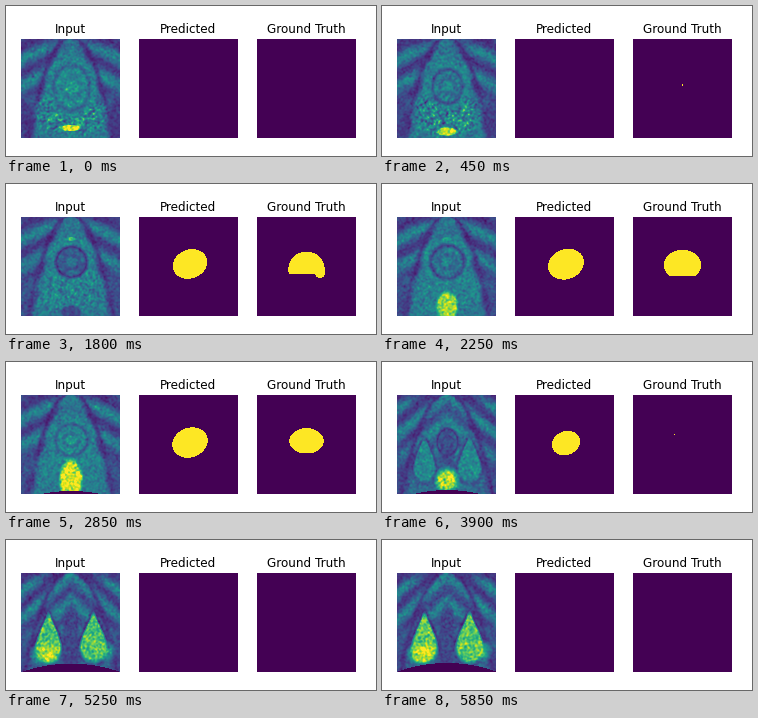
A matplotlib script for the animation above (6 s loop, 370 by 150 pixels).

```python
import numpy as np
import matplotlib.pyplot as plt
from matplotlib.animation import FuncAnimation

W, H, DPI = 370, 150, 100
N = 99          # panel side in pixels
SLICES = 40
STEP = 150      # ms per slice

Y, X = np.mgrid[0:N, 0:N] + 0.5
U = np.abs(X - 50)


def ease(i, start, end):
    p = np.clip((i - start) / (end - start), 0, 1)
    return p * p * (3 - 2 * p)


def pulse(i, mid, half):
    return ease(half - abs(i - mid), 0, half)


def noise(passes, seed):
    a = np.random.default_rng(seed).normal(size=(SLICES, N, N))
    for axis in [0] + [1, 2] * passes:
        a = (np.roll(a, 1, axis) + 2 * a + np.roll(a, -1, axis)) / 4
    return a / a.std()


FINE, BLOTCH = noise(1, 4), noise(4, 9)


def ellipse(cx, cy, rx, ry, edge=0.2, x=X):
    d = np.hypot((x - cx) / rx, (Y - cy) / ry)
    return np.clip((1 - d) / edge + 0.5, 0, 1)


def paint(img, mask, level, alpha=1.0):
    a = mask * alpha
    return img * (1 - a) + level * a


def scan(i):
    bladder = 1 - ease(i, 0, 7)
    gland = pulse(i, 16, 18)
    late = ease(i, 19, 29)
    fat = ease(i, 22, 38)

    # muscle and bone bands falling away from the midline
    depth = Y - (0.55 + 0.35 * late) * U
    fade = np.clip((85 - Y) / 45, 0.2, 1)
    img = 0.3 + 0.14 * fade * np.sin(2 * np.pi * depth / 26 + 3 - 2 * i / SLICES)
    img = paint(img, np.clip(1.2 - Y / 9, 0, 1) * (U > 8), 0.12, 0.6)

    # soft tissue inside a thin dark arch
    arch = (28 + 3 * late) * np.sqrt(Y / 50)
    img = paint(img, np.clip((arch - U) / 4, 0, 1), 0.42, 0.8 - 0.6 * late)
    img = paint(img, np.exp(-((U - arch - 3) / 3) ** 2), 0.1, 0.75)
    img = paint(img, ellipse(47, 82, 11, 20, 0.5, U), 0.15, 0.4 + 0.5 * bladder)

    # speckled bed around the rectum
    bed = 0.44 + 0.07 * (1 - ease(i, 4, 18)) * (BLOTCH[i] + FINE[i])
    img = paint(img, ellipse(50, 74, 33, 22, 0.4), bed, 0.85 * (1 - late))

    # central organ: halo, rim, body, core
    cy = 45 + 4 * bladder + 3 * late
    rx = 6 + 13 * bladder + 12 * gland
    ry = rx * (1 + 0.25 * bladder + 0.4 * late)
    level = 0.28 + 0.2 * bladder + 0.17 * pulse(i, 19, 9)
    img = paint(img, ellipse(50.5, cy, rx + 6, ry + 6), 0.45, 0.7 * (1 - late))
    img = paint(img, ellipse(50.5, cy, rx, ry), level - 0.2)
    img = paint(img, ellipse(50.5, cy, rx * 0.85, ry * 0.85), level + 0.03 * BLOTCH[i])
    img = paint(img, ellipse(50.5, cy, rx * 0.6, ry * 0.5), level - 0.08, 0.8)
    img = paint(img, ellipse(50.5, cy, rx * 0.35, ry * 0.28, 0.5), level + 0.1, 0.8)
    img = paint(img, ellipse(50, 22, 5, 2, 0.5), 0.65, pulse(i, 12, 6))

    # dark midline and the two fat lobes, pointed at the top
    img = paint(img, ellipse(50, 66, 8, 34, 0.4), 0.2, 0.8 * late)
    taper = np.clip((Y - 32) / 45, 0.3, 1.1)
    wide = (12 + 3 * fat + (X > 50)) * taper
    tall = 21 + 4 * fat
    img = paint(img, ellipse(22.5, 65, wide + 3, tall + 3, x=U), 0.12, 0.8 * late)
    img = paint(img, ellipse(22.5, 65, wide, tall, x=U), 0.5 + 0.24 * fat, late)
    img = paint(img, ellipse(25, 81, 12, 9, 0.9), 0.93, 0.9 * fat ** 2)
    img = paint(img, ellipse(86, 78, 7, 8, 0.9), 0.85, 0.6 * fat ** 2)

    # rectum: bright, collapsed for a while, then filled and finally dark
    filled = pulse(i, 19, 9)
    dull = max(pulse(i, 12, 4), ease(i, 27, 31))
    img = paint(img, ellipse(50, 98 - 9 * bladder - 13 * ease(i, 10, 18), 10 + filled,
                             6 - 3 * bladder + 14 * filled + 4 * late, 0.3 + 0.5 * late),
                0.97 - 0.77 * dull, 0.95)

    img = img * (1 + 0.08 * FINE[i]) + 0.015 * FINE[i]
    img[Y > 106 - 10 * ease(i, 14, 19) - 6 * fat + 0.0035 * U ** 2] = 0
    return np.clip(img, 0, 1)


def predicted(i):
    if not 4 <= i <= 33:
        return np.zeros((N, N))
    r = 18 * (1 - ((i - 16.3) / 17) ** 2) ** 0.6
    dx, dy = X - 51, Y - 46 - 0.08 * i
    return np.hypot(dx / r, (dy + 0.12 * dx) / (0.85 * r)) < 1


def truth(i):
    phase = (i - 14.5) / 11.5
    if abs(phase) > 1:
        return np.zeros((N, N))
    early = 1 - ease(i, 7, 13)
    flat = pulse(i, 12, 5)      # lower side cut off, with a lobe on the right
    away = ease(i, 19, 26)
    rx = 0.6 + 18 * np.sqrt(1 - phase ** 2)
    ry = rx * (0.75 + 0.17 * early + 0.2 * flat)
    dy = (Y - 46 - 6 * flat + 6.5 * away) / ry
    dx = (X - 49.5 + 8 * away) / (rx * (1 + 0.2 * early * dy))
    body = (np.hypot(dx, dy) < 1) & (dy < 0.95 - 0.65 * flat)
    return body | (np.hypot(X - 63, Y - 56) < 5 * flat)


plt.rcParams["font.family"] = "DejaVu Sans"
fig, axes = plt.subplots(1, 3, figsize=(W / DPI, H / DPI), dpi=DPI, facecolor="white")
fig.subplots_adjust(left=15 / W, right=349.8 / W, bottom=18.48 / H, top=116.95 / H, wspace=0.2)

panels = []
for ax, title, make in zip(axes, ("Input", "Predicted", "Ground Truth"), (scan, predicted, truth)):
    ax.axis("off")
    ax.set_title(title, fontsize=12 * 72 / DPI, pad=6 * 72 / DPI)
    image = ax.imshow(np.zeros((N, N)), cmap="viridis", vmin=0, vmax=1,
                      interpolation="nearest", aspect="auto")
    panels.append((image, make))


def draw(i):
    for image, make in panels:
        image.set_data(make(i).astype(float))
    return [image for image, _ in panels]


anim = FuncAnimation(fig, draw, frames=SLICES, interval=STEP, repeat=True, repeat_delay=0)
plt.show()
```
